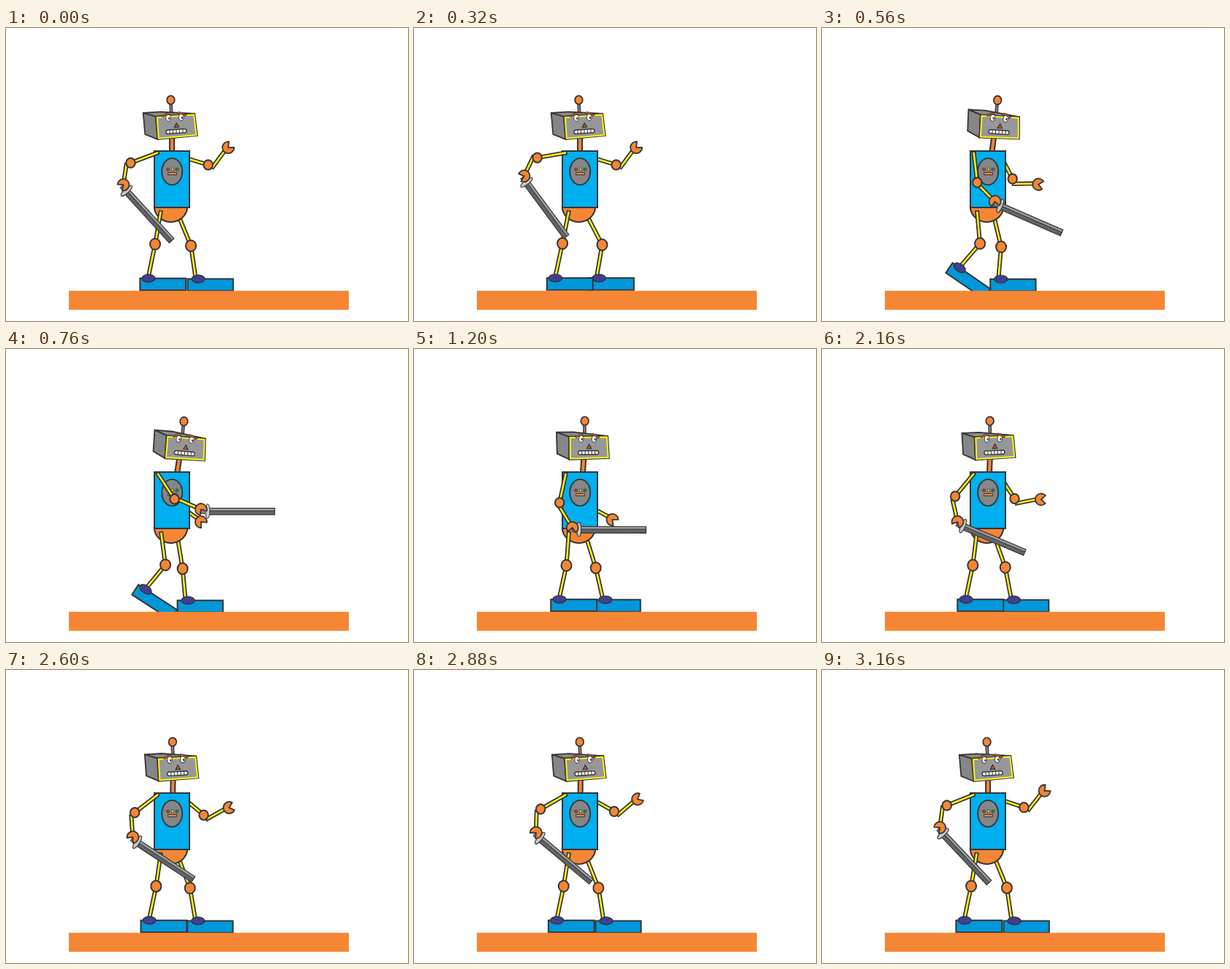
Write an HTML page with a canvas that moves like this. It is 550 px wide and 400 px high and loops after 3.2 s.

```html
<!DOCTYPE html>
<html lang="en">
<head>
<meta charset="utf-8">
<title>Robot with sword</title>
<style>
  html, body { margin: 0; width: 100%; height: 100%; overflow: hidden; background: #fff; }
  canvas { display: block; }
</style>
</head>
<body>
<canvas id="stage" width="550" height="400"></canvas>
<script>
const ctx = document.getElementById('stage').getContext('2d');
const LOOP = 3200, STEP = 40;
const INK = '#373435', ORANGE = '#f58634', YELLOW = '#fff212', BLUE = '#00afef',
      SHOE = '#0098da', ANKLE = '#3e4095', GREY = '#848688', FACE = '#969798';

// Poses: stand, wind up, thrust, recover, then a slow drift back to standing.
const rest = {
  shift: 0, tilt: 0,
  upper: 159.8, fore: 108.4, reach: 31.6, sword: 47.5,
  farUpper: 17, farFore: -53.5,
  kneeX: 204, kneeY: 295, ankleX: 195, ankleY: 341.7, heel: 0,
  farKneeX: 253, farKneeY: 297.3, farAnkleX: 263, farAnkleY: 342.5
};
const windUp = { ...rest,
  upper: 171.3, fore: 128, reach: 30.8, sword: 54.2,
  kneeX: 203, kneeY: 294, ankleX: 193.3, ankleY: 341.3,
  farKneeX: 258, farKneeY: 295.8, farAnkleX: 251.8, farAnkleY: 341.2
};
const thrust = {
  shift: 9, tilt: 12,
  upper: 33.8, fore: -1.5, reach: 38.6, sword: 5,
  farUpper: 90, farFore: 31,
  kneeX: 224, kneeY: 294.3, ankleX: 185.3, ankleY: 319, heel: 55,
  farKneeX: 237.3, farKneeY: 300.5, farAnkleX: 240.5, farAnkleY: 343.8
};
const recover = {
  shift: 4.7, tilt: 4,
  upper: 95, fore: 55.5, reach: 39.5, sword: -7.5,
  farUpper: 106, farFore: 41,
  kneeX: 209.2, kneeY: 295.5, ankleX: 199.6, ankleY: 341.8, heel: 0,
  farKneeX: 248, farKneeY: 299, farAnkleX: 261.8, farAnkleY: 342.3
};
const keys = [[0, rest], [360, windUp], [680, thrust], [880, recover], [LOOP, rest]];

const rad = deg => deg * Math.PI / 180;
const polar = (x, y, deg, len) => [x + len * Math.cos(rad(deg)), y + len * Math.sin(rad(deg))];

function poseAt(t) {
  const i = keys.findIndex(k => k[0] > t);
  const [t0, a] = keys[i - 1], [t1, b] = keys[i];
  const f = (t - t0) / (t1 - t0), pose = {};
  for (const name in a) pose[name] = a[name] + (b[name] - a[name]) * f;
  return pose;
}

function paint(fill, width = 2, stroke = INK) {
  if (fill) { ctx.fillStyle = fill; ctx.fill(); }
  if (width) { ctx.lineWidth = width; ctx.strokeStyle = stroke; ctx.stroke(); }
}
function poly(points, fill, width, stroke) {
  ctx.beginPath();
  points.forEach(p => ctx.lineTo(...p));
  ctx.closePath();
  paint(fill, width, stroke);
}
function box(x, y, w, h, fill, width) {
  ctx.beginPath();
  ctx.rect(x, y, w, h);
  paint(fill, width);
}
function oval(x, y, rx, ry, fill, width) {
  ctx.beginPath();
  ctx.ellipse(x, y, rx, ry, 0, 0, 2 * Math.PI);
  paint(fill, width);
}
function line(x1, y1, x2, y2, width, color) {
  ctx.beginPath();
  ctx.moveTo(x1, y1);
  ctx.lineTo(x2, y2);
  paint(null, width, color);
}
function bone(x1, y1, x2, y2) {
  const d = Math.hypot(x2 - x1, y2 - y1), ux = (x2 - x1) / d, uy = (y2 - y1) / d;
  line(x1, y1, x2, y2, 6, INK);
  line(x1 + ux * 1.6, y1 + uy * 1.6, x2 - ux, y2 - uy, 2.5, YELLOW);
}
function placed(x, y, deg, draw) {
  ctx.save();
  ctx.translate(x, y);
  ctx.rotate(rad(deg));
  draw();
  ctx.restore();
}

function claw(x, y, deg) {
  placed(x, y, deg, () => {
    ctx.beginPath();
    ctx.moveTo(0, 0);
    ctx.arc(0, 0, 8, rad(42), rad(318));
    ctx.closePath();
    paint(ORANGE, 1.8);
  });
}

// The shin meets the foot slightly behind the middle of the ankle.
function leg(hipX, hipY, kx, ky, ax, ay, back, front, deg, inset) {
  placed(ax, ay, deg, () => box(-back, 0, back + front, 16.3, SHOE));
  bone(hipX, hipY, kx, ky);
  bone(kx, ky, ax - inset, ay);
  oval(kx, ky, 7, 7.6, ORANGE);
  placed(ax, ay, deg, () => oval(0, 0, 9, 5.2, ANKLE, 1.4));
}

function farArm(p) {
  const [ex, ey] = polar(246, 177.5, p.farUpper, 32);
  bone(246, 177.5, ex, ey);
  placed(ex, ey, p.farFore, () => {
    bone(-1, 6.8, 29, 6.8);
    claw(35.4, 8, 12);
  });
  oval(ex, ey, 6.2, 6.6, ORANGE);
}

function sword(x, y, deg) {
  placed(x, y, deg, () => {
    box(0, 0.8, 9, 5, GREY, 1);
    box(11, -1.6, 89.8, 8.8, '#636466', 0);
    box(11, -1.6, 89.8, 3.6, '#9d9fa2', 0);
    line(11, 2, 100.8, 2, 1, INK);
    box(11, -1.6, 89.8, 8.8, null, 1.2);
    oval(9, 2.4, 3, 10, '#c7c8ca', 1);
  });
}

function nearArm(p) {
  const [ex, ey] = polar(209, 170, p.upper, 41);
  const [hx, hy] = polar(ex, ey, p.fore, p.reach);
  const [sx, sy] = polar(ex, ey, 2 * p.fore - 35, 5.5);
  const [topX, topY] = polar(207.6, 170.3, p.upper, -2);
  sword(hx, hy, p.sword);
  bone(topX, topY, ex, ey);
  bone(sx, sy, hx, hy);
  oval(ex, ey, 6.2, 6.6, ORANGE);
  claw(hx, hy, p.fore + 35);
}

function eye(x, y) {
  oval(x, y, 3.3, 4.6, '#fff', 1);
  oval(x + 1.2, y + 0.6, 1.1, 1.7, INK, 0);
}
function brow(x1, y1, cx, cy, x2, y2) {
  for (const [w, color] of [[3.2, INK], [1.4, '#c9622b']]) {
    ctx.beginPath();
    ctx.moveTo(x1, y1);
    ctx.quadraticCurveTo(cx, cy, x2, y2);
    paint(null, w, color);
  }
}

function head() {
  box(224, 148, 6, 24, ORANGE);
  line(225.4, 102, 226.2, 116, 4.6, INK);
  line(225.4, 102, 226.2, 116, 2, GREY);
  oval(225.4, 98.2, 5.3, 5.9, ORANGE, 1.8);

  const a = [187.7, 116], b = [205, 121], c = [207.5, 152], d = [258, 117];
  poly([a, [211, 114.3], d, b], '#8a8c8e', 1.8);
  poly([a, b, c, [190.3, 145]], GREY, 1.8);
  poly([b, d, [261.7, 146.8], c], FACE, 2);
  poly([[206.8, 122.2], [257, 118.4], [260.4, 146], [208.8, 150.7]], null, 2, YELLOW);

  eye(222, 122.8);
  eye(239.7, 121.8);
  brow(214, 121.6, 218, 117.4, 224.5, 116.3);
  brow(235.5, 115.8, 241, 115.6, 246.4, 120);
  poly([[230.4, 135.7], [236.6, 135.2], [233.2, 129.7]], '#c9622b', 1.3);

  placed(233, 141.1, -4, () => {
    ctx.beginPath();
    ctx.roundRect(-14, -2.6, 28, 5.2, 2.6);
    paint('#fff', 1.4);
    for (let x = -9; x < 12; x += 4.5) line(x, -2.6, x, 2.6, 1, INK);
  });
}

function torso() {
  box(203, 168, 48, 77, BLUE);
  oval(227.2, 196, 14, 18.2, GREY, 1.8);
  ['#ed3237', YELLOW, '#00a859'].forEach((c, i) => oval(221.6 + i * 6.2, 193, 1.9, 1.9, c, 0.9));
  box(221.7, 197.3, 11.8, 3.2, ORANGE, 1);
}

function draw(t) {
  const p = poseAt(t);
  ctx.fillStyle = '#fff';
  ctx.fillRect(0, 0, 550, 400);
  ctx.lineJoin = 'miter';
  ctx.miterLimit = 2.5;

  leg(233.5, 250, p.farKneeX, p.farKneeY, p.farAnkleX, p.farAnkleY, 14.5, 47.8, 0, 3.4);
  ctx.beginPath();
  ctx.ellipse(225.5, 243, 22.8, 22, 0, 0, Math.PI);
  paint(ORANGE);
  leg(212, 249, p.kneeX, p.kneeY, p.ankleX, p.ankleY, 11.7, 51.2, p.heel, 0.6);
  box(86, 358.7, 383, 26.1, ORANGE, 0);

  farArm(p);
  placed(227 + p.shift, 168, p.tilt, () => {
    ctx.translate(-227, -168);
    head();
  });
  torso();
  nearArm(p);
}

let start;
function tick(now) {
  start ??= now;
  const t = (now - start) % LOOP;
  draw(Math.floor(t / STEP + 0.01) * STEP % LOOP);
  requestAnimationFrame(tick);
}
draw(0);
requestAnimationFrame(tick);
</script>
</body>
</html>
```
